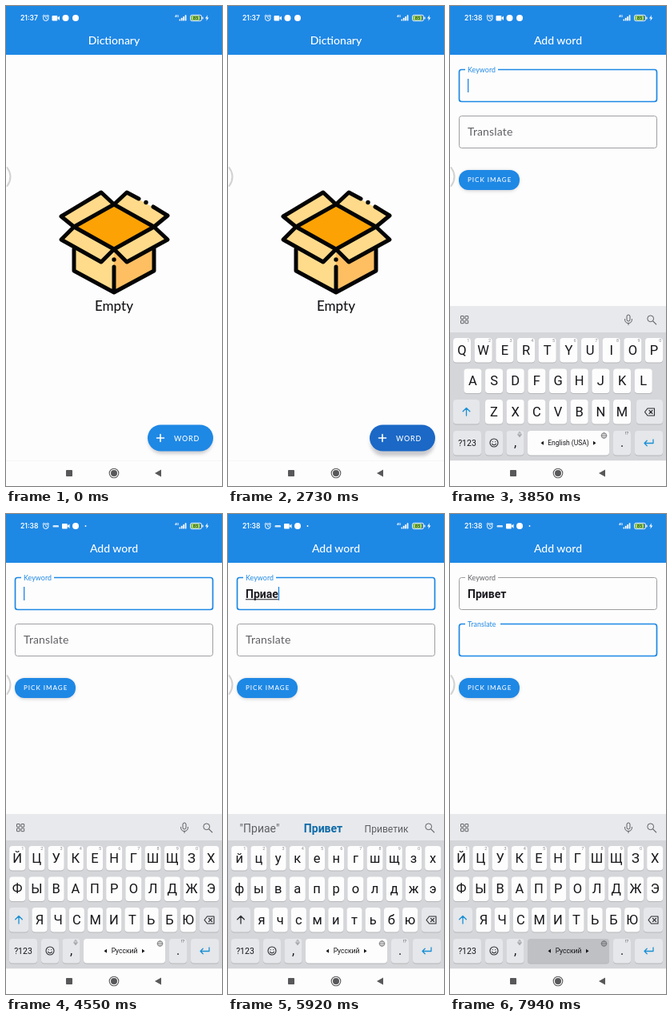
Write an HTML page that moves like this. It is 270x600 px and loops after 7.99 s.

```html
<!DOCTYPE html>
<html lang="en">
<head>
<meta charset="utf-8">
<title>Dictionary app</title>
<style>
html, body { margin: 0; width: 100%; height: 100%; overflow: hidden; background: #fdfdfd; }
svg { display: block; width: 100%; height: 100%; }
.ui { font-family: Lato, "Open Sans", sans-serif; font-weight: 500; }
.label { font-family: Lato, "Open Sans", sans-serif; font-weight: 400; }
.sys { font-family: Roboto, "Noto Sans", sans-serif; }
.clock { font-family: Inter, Roboto, sans-serif; font-weight: 600; }
</style>
</head>
<body>
<svg id="stage" viewBox="0 0 270 600"></svg>
<script>
const LOOP = 7990;
const PAGE = '#fdfdfd', BLUE = '#1e88e5', INK = '#16161a', GREY = '#5f6064', ACCENT = '#1a8fd4';
const T = {
  press: 2540, push: 2770, focus: 3380, keyboard: 3440, minute: 3500,
  swipe: 4160, russian: 4340, pick: 6480, next: 7260, hold: 7880
};
// Each key: letter, row, column, moment it is released
const TYPED = [
  ['П', 1, 4, 4950], ['р', 1, 5, 5320], ['и', 2, 4, 5480], ['а', 1, 3, 5650], ['е', 0, 4, 5820]
];
const ROWS = [430, 468.5, 507, 546];
const stage = document.getElementById('stage');

function el(tag, attrs, parent = stage, text) {
  const node = document.createElementNS('http://www.w3.org/2000/svg', tag);
  for (const k in attrs) node.setAttribute(k, attrs[k]);
  if (text !== undefined) node.textContent = text;
  parent.appendChild(node);
  return node;
}
const group = (parent, attrs = {}) => el('g', attrs, parent);
const rect = (p, x, y, width, height, rx, fill, more) => el('rect', { x, y, width, height, rx, fill, ...more }, p);
const circle = (p, cx, cy, r, fill, more) => el('circle', { cx, cy, r, fill, ...more }, p);
const shape = (p, d, fill) => el('path', { d, fill }, p);
const line = (p, d, stroke, width = 1) => el('path', {
  d, stroke, fill: 'none', 'stroke-width': width, 'stroke-linecap': 'round', 'stroke-linejoin': 'round'
}, p);
const text = (p, cls, x, y, size, fill, str, more) =>
  el('text', { class: cls, x, y, 'font-size': size, fill, ...more }, p, str);
const MID = { 'text-anchor': 'middle' };
const show = (node, on) => node.setAttribute('display', on ? 'inline' : 'none');
const move = (node, x, y) => node.setAttribute('transform', `translate(${x} ${y})`);
const ramp = (t, start, length) => Math.min(1, Math.max(0, (t - start) / length));
const easeOut = k => 1 - (1 - k) * (1 - k);

const defs = el('defs', {});
const blur = el('filter', { id: 'blur', x: '-20%', y: '-50%', width: '140%', height: '200%' }, defs);
el('feGaussianBlur', { stdDeviation: 2 }, blur);

rect(stage, 0, 0, 270, 600, 0, PAGE);
rect(stage, 0, 0, 270, 61, 0, BLUE);

function pill(p, x, y, w, h, r, drop) {
  const shadow = rect(p, x + 1, y + drop, w - 2, h, r, '#b4b4ba', { filter: 'url(#blur)', opacity: .7 });
  return { shadow, face: rect(p, x, y, w, h, r, BLUE) };
}

// List page
const home = group(stage);
text(home, 'ui', 135, 47.5, 14, '#fff', 'Dictionary', MID);
drawBox(group(home));
text(home, 'ui', 135, 380.5, 17, INK, 'Empty', MID);
const fab = pill(home, 177, 523.5, 82, 33, 16.5, 3);
line(home, 'M188.5 540h9M193 535.5v9', '#fff', 1.6);
text(home, 'ui', 210, 543.5, 9, '#fff', 'WORD', { 'letter-spacing': .8 });

function drawBox(g) {
  const flaps = ['M85 276L69 263L119 233L135 248Z', 'M135 248L151 233L202 262L185 276Z',
    'M85 276L69 292L119 320L135 304Z', 'M185 276L202 292L151 320L135 304Z'];
  shape(g, 'M85 276L135 304V358L85 331Z', '#ffdc8c');
  shape(g, 'M185 276L135 304V358L185 331Z', '#fdbf62');
  shape(g, 'M85 276L135 248L185 276L135 304Z', '#fca204');
  flaps.forEach(d => shape(g, d, '#ffda8a'));
  const ink = '#050506';
  [0, 2, 3].forEach(i => line(g, flaps[i], ink, 5));
  line(g, 'M85 304V331L135 358L185 331V304M135 326V356', ink, 5);
  line(g, 'M166 241L151 233L135 248L185 276L202 262L184 251', ink, 5);
  circle(g, 175, 245.5, 2.7, ink);
  circle(g, 135, 317, 2.7, ink);
}

// Form page
const form = group(stage);
text(form, 'ui', 135, 47.5, 14, '#fff', 'Add word', MID);

function field(y, name, gapWidth) {
  const frame = rect(form, 11.5, y + .5, 247, 40, 3, 'none');
  const gap = rect(form, 19, y - 2, gapWidth, 5, 0, PAGE);
  const label = text(form, 'label', 0, 0, 14, GREY, name, { 'letter-spacing': .15 });
  return (k, focused) => {
    frame.setAttribute('stroke', focused ? BLUE : '#949498');
    frame.setAttribute('stroke-width', focused ? 1.7 : .9);
    show(gap, k > .5);
    label.setAttribute('fill', focused ? BLUE : GREY);
    label.setAttribute('transform', `translate(22 ${y + 25 - 21 * k}) scale(${1 - .37 * k})`);
  };
}
const keyword = field(79, 'Keyword', 41);
const translate = field(137, 'Translate', 44);
const entry = text(form, 'sys', 22, 104.5, 14, '#1c1c22', '', { 'font-weight': 700 });
const underline = rect(form, 22, 106.3, 0, 1, 0, '#1c1c22');
const caret = rect(form, 22, 91, 1.3, 17, 0, BLUE);
pill(form, 11, 205, 76, 25, 12, 1);
text(form, 'ui', 22, 220.3, 8, '#fff', 'PICK IMAGE', { 'letter-spacing': 1 });
pill(form, 72, 517, 126, 33, 16.5, 2.5);
text(form, 'ui', 83, 537, 9, '#fff', 'ADD TO DICTIONARY', { 'letter-spacing': .8 });

// Edge handle
line(stage, 'M1.5 202Q9.5 213.5 1.5 225', '#d2d2d2', 2);

// Keyboard
const board = group(stage);
rect(board, 0, 375, 270, 34, 0, '#e8e9ec');
rect(board, 0, 408, 270, 162, 0, '#d5d6d9');

function key(p, cx, row, w, fill = '#fdfdfd') {
  const x = cx - w / 2, y = ROWS[row] - 15;
  rect(p, x, y + 1, w, 30.5, 4, '#b6b7ba');
  return rect(p, x, y, w, 30.5, 4, fill);
}
const SPECIAL = '#e5e7ea';

function column(lang, row, i) {
  if (lang === 'en') return [15, 28.4, 55][row] + 26.67 * i;
  return row < 2 ? 14.2 + 24.2 * i : 42 + 23.2 * i;
}
function layout(lang, rows, caps) {
  const g = group(board), ru = lang === 'ru';
  rows.forEach((letters, row) => [...letters].forEach((c, i) => {
    const x = column(lang, row, i);
    key(g, x, row, ru ? (row < 2 ? 20 : 19) : 22);
    text(g, 'sys', x, ROWS[row] + 5.7, 16.5, INK, caps ? c.toUpperCase() : c, MID);
    if (row === 0 && i < 10) text(g, 'sys', x + (ru ? 6.5 : 7.8), 420.3, 5.5, '#8c8c92', (i + 1) % 10, MID);
  }));
  const w = ru ? 24 : 33, sx = 4 + w / 2, bx = 266 - w / 2;
  key(g, sx, 2, w, SPECIAL);
  key(g, bx, 2, w, SPECIAL);
  line(g, `M${sx} 512v-9.5m-4.3 4.3l4.3 -4.3l4.3 4.3`, caps ? ACCENT : '#2c2c30', 1.3);
  line(g, `M${bx - 6} 507.5l3.5 -4.5h8.5v9h-8.5zM${bx - .5} 505.5l4 4m0 -4l-4 4`, '#2c2c30', 1.1);
  return g;
}
const RU = ['йцукенгшщзх', 'фывапролджэ', 'ячсмитьбю'];
const english = layout('en', ['qwertyuiop', 'asdfghjkl', 'zxcvbnm'], true);
const ruCaps = layout('ru', RU, true);
const ruLower = layout('ru', RU, false);

key(board, 21.5, 3, 35, SPECIAL);
text(board, 'sys', 21.5, 549.8, 10.5, INK, '?123', MID);
key(board, 55, 3, 22, SPECIAL);
circle(board, 55, 546, 5, 'none', { stroke: '#2c2c30', 'stroke-width': 1.1 });
line(board, 'M52.6 547.4q2.4 2.8 4.8 0M53.2 544.5v.2M56.8 544.5v.2', '#2c2c30', 1.1);
key(board, 81.5, 3, 22, SPECIAL);
text(board, 'sys', 81.5, 551, 16, INK, ',', MID);
mic(board, 87, 535.5, .5);
const space = key(board, 148, 3, 102);
circle(board, 192.5, 537, 3.3, 'none', { stroke: GREY, 'stroke-width': .8 });
line(board, 'M189.2 537h6.6M192.5 533.7q-3 3.3 0 6.6q3 -3.3 0 -6.6', GREY, .6);
key(board, 215, 3, 22, SPECIAL);
text(board, 'sys', 215, 551, 16, INK, '.', MID);
text(board, 'sys', 221, 536, 6, GREY, '!?', MID);
key(board, 248.5, 3, 35, SPECIAL);
line(board, 'M254 542v4.5h-11m3.2 -3.2l-3.2 3.2l3.2 3.2', ACCENT, 1.3);

function spaceLabel(name, half) {
  const g = group(board);
  text(g, 'sys', 148, 549.3, 8.5, INK, name, MID);
  shape(g, `M${148 - half} 546.3l3.5 -2.5v5zM${148 + half} 546.3l-3.5 -2.5v5z`, INK);
  return g;
}
const spaceEn = spaceLabel('English (USA)', 34.5);
const spaceRu = spaceLabel('Русский', 25.5);

function mic(p, x, y, s) {
  const g = group(p, { transform: `translate(${x} ${y}) scale(${s})` });
  rect(g, -2, -6, 4, 8, 2, 'none', { stroke: GREY, 'stroke-width': 1 });
  line(g, 'M-4.5 -.5q0 5 4.5 5t4.5 -5M0 4.5v2', GREY, 1);
}
const tools = group(board);
[[13.5, 387.5], [19, 387.5], [13.5, 393], [19, 393]].forEach(([x, y]) =>
  rect(tools, x, y, 3.7, 3.7, .4, 'none', { stroke: GREY, 'stroke-width': 1 }));
mic(tools, 223, 392, 1);
circle(board, 250.7, 390.8, 3.9, 'none', { stroke: GREY, 'stroke-width': 1 });
line(board, 'M253.7 393.8l4 4', GREY, 1.1);

const hints = group(board);
const hintNodes = [39.5, 119, 198].map(x => text(hints, 'sys', x, 398, 14, GREY, '', MID));
function setHints(word) {
  const words = word === 'П' ? ['По', 'После'] : word === 'Пр' ? ['При', 'Про'] : ['Привет', 'Приветик'];
  [`"${word}"`, ...words].forEach((w, i) => { hintNodes[i].textContent = w; });
  const strong = word === 'Приае';
  hintNodes[1].setAttribute('font-weight', strong ? 700 : 400);
  hintNodes[1].setAttribute('fill', strong ? '#0d6aa8' : GREY);
  hintNodes[2].setAttribute('font-size', words[1].length > 6 ? 12.1 : 14);
}

const pressed = group(board);
const pressedKey = rect(pressed, -10, -15, 20, 30.5, 4, '#b4b5ba');
const pressedChar = text(pressed, 'sys', 0, 5.7, 16.5, INK, '', MID);
circle(pressed, 0, -36.7, 17.4, '#c6c7ca');
circle(pressed, 0, -37.5, 17.3, '#fdfdfd');
const popChar = text(pressed, 'sys', 0, -30.5, 22, INK, '', MID);

// Navigation bar
rect(stage, 0, 568, 270, 32, 0, PAGE);
rect(stage, 0, 568, 270, .6, 0, '#f0f0f0');
rect(stage, 75, 580, 8, 8, .8, '#58585a');
circle(stage, 135, 584, 5.8, 'none', { stroke: '#58585a', 'stroke-width': 1.1 });
circle(stage, 135, 584, 4, '#58585a');
shape(stage, 'M186 584L194 579.5V588.5Z', '#58585a');

// Status bar
const clock = text(stage, 'clock', 18, 18, 8.5, '#fff', '21:37');
circle(stage, 49.8, 15.2, 3.3, 'none', { stroke: '#fff', 'stroke-width': 1 });
line(stage, 'M49.8 13.3v2l1.3 .8M45.8 12.6l1.8 -1.5M53.8 12.6l-1.8 -1.5', '#fff', .9);
const camera = group(stage);
rect(camera, 57.5, 12, 6.8, 6.4, 1, '#fff');
shape(camera, 'M64 15L67 12.5V18Z', '#fff');
const badge = circle(stage, 74.5, 15, 4, '#fff');
circle(stage, 87, 15, 4, '#fff');
const extra = group(stage);
rect(extra, 58.5, 14, 7.5, 2.6, 1.2, '#d6e8fa');
circle(extra, 99.5, 15, .9, '#fff');
text(stage, 'sys', 211, 14, 4, '#fff', '4G', { 'font-weight': 700 });
for (let i = 0; i < 4; i++) rect(stage, 216.5 + 2.4 * i, 16.6 - 1.8 * i, 1.7, 1.8 + 1.8 * i, .4, '#fff');
rect(stage, 230.5, 11.3, 14, 7.4, 2, '#3d7fb4', { stroke: '#fff', 'stroke-width': .9 });
rect(stage, 231.5, 12.3, 10.5, 5.4, 1, '#a4dc50');
rect(stage, 245.3, 13.6, 1.2, 2.8, .5, '#fff');
text(stage, 'sys', 237, 17.2, 5.8, '#31552f', '85', { ...MID, 'font-weight': 700 });
shape(stage, 'M252 11.3L249 15.6H251L250.3 18.8L253.4 14.4H251.4Z', '#fff');

function mix(k) {
  const a = [30, 136, 229], b = [27, 104, 198];
  return `rgb(${a.map((v, i) => Math.round(v + (b[i] - v) * k))})`;
}

function render(t) {
  const touch = ramp(t, T.press, 170), slide = easeOut(ramp(t, T.push, 300));
  fab.face.setAttribute('fill', mix(touch));
  fab.shadow.setAttribute('y', 526.5 + 3 * touch);
  move(home, -270 * slide, 0);
  move(form, 270 * (1 - slide), 0);

  const second = t >= T.next;
  keyword(easeOut(ramp(t, T.focus, 180)), t >= T.focus && !second);
  translate(easeOut(ramp(t, T.next, 180)), second);

  const done = TYPED.filter(k => t >= k[3]);
  const typed = done.map(k => k[0]).join('');
  const picked = t >= T.pick;
  entry.textContent = picked ? 'Привет' : typed;
  const width = typed ? entry.getComputedTextLength() : 0;
  underline.setAttribute('width', width);
  show(underline, typed && !picked);

  const since = second ? T.next : picked ? T.pick : typed ? done[done.length - 1][3] : T.focus;
  show(caret, t >= T.focus && Math.floor((t - since) / 500) % 2 === 0);
  caret.setAttribute('x', second ? 22 : 22 + width + (picked ? 3.5 : 0));
  caret.setAttribute('y', second ? 149 : 91);

  const up = easeOut(ramp(t, T.keyboard, 240));
  show(board, up > 0);
  move(board, 0, 195 * (1 - up));
  const russian = t >= T.russian, caps = !typed || second;
  show(english, !russian);
  show(ruCaps, russian && caps);
  show(ruLower, russian && !caps);
  show(spaceEn, !russian);
  show(spaceRu, russian);
  const held = (t >= T.swipe && t < T.russian + 60) || t >= T.hold;
  space.setAttribute('fill', held ? '#bfc0c4' : '#fdfdfd');

  const composing = typed && !picked;
  show(hints, composing);
  show(tools, !composing);
  if (composing) setHints(typed);

  const down = TYPED.find(k => t >= k[3] - 90 && t < k[3]);
  show(pressed, down);
  if (down) {
    const [c, row, col] = down;
    move(pressed, column('ru', row, col), ROWS[row]);
    pressedKey.setAttribute('width', row < 2 ? 20 : 19);
    pressedChar.textContent = popChar.textContent = c;
  }

  clock.textContent = t < T.minute ? '21:37' : '21:38';
  move(camera, russian ? 12.5 : 0, 0);
  show(badge, !russian);
  show(extra, russian);
}

const begin = performance.now();
function tick() {
  render((performance.now() - begin) % LOOP);
  requestAnimationFrame(tick);
}
tick();
</script>
</body>
</html>
```
